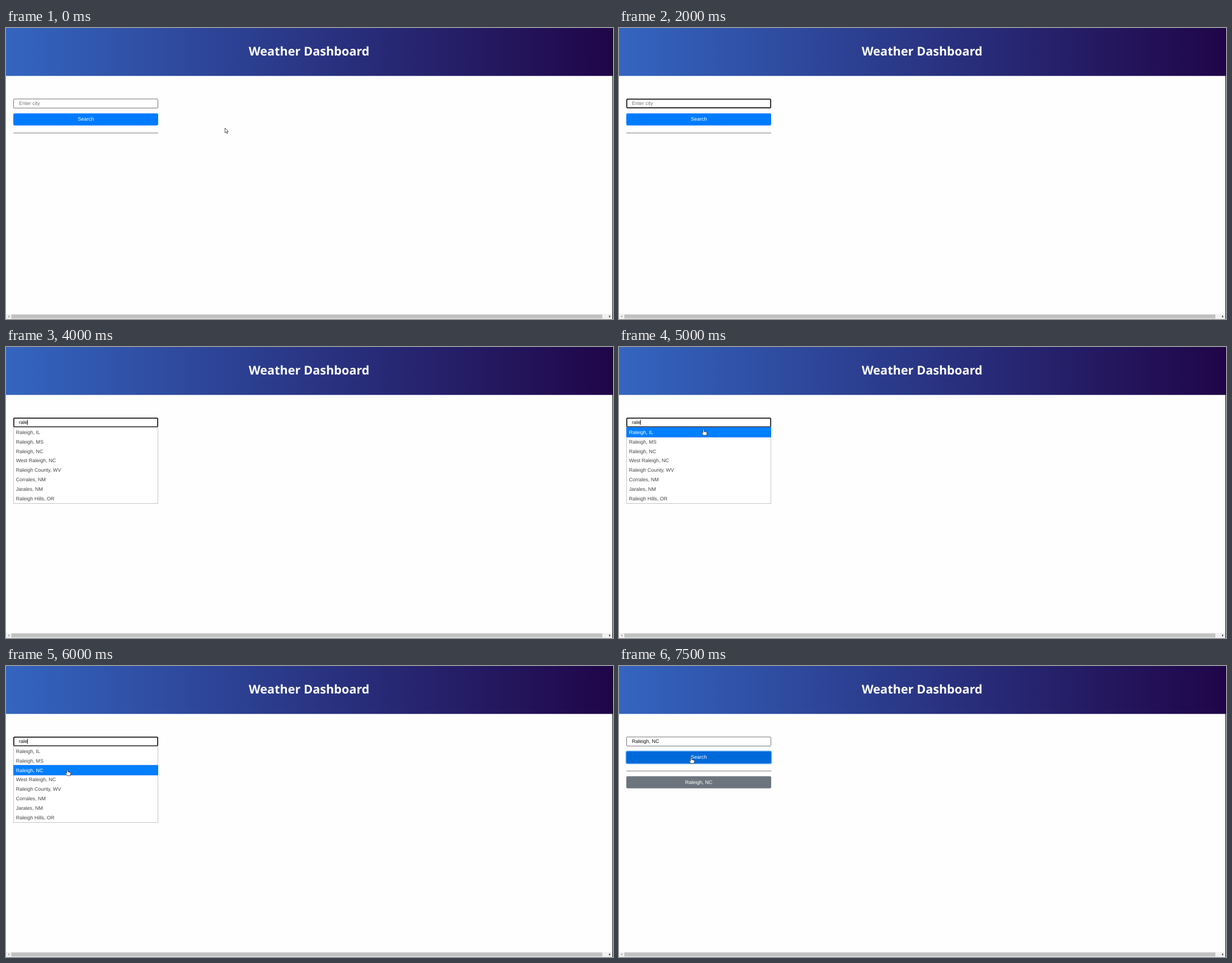
Animation, 1081 px wide and 518 px high, one loop 8000 ms. Source, as an HTML page:

```html
<!DOCTYPE html>
<html lang="en">
<head>
<meta charset="utf-8">
<title>Weather Dashboard</title>
<style>
  html, body { margin: 0; width: 100%; height: 100%; overflow: hidden; background: #fefefe; }
  svg { display: block; width: 1081px; height: 518px; }
  text { font: 9px "Liberation Sans", Arial, sans-serif; text-rendering: geometricPrecision; }
  .title { font: 600 21.6px "Noto Sans", "Open Sans", sans-serif; }
  .mid { text-anchor: middle; fill: #fff; }
  .cursor { fill: #fff; stroke: #222; stroke-width: .8; stroke-linejoin: round; }
</style>
</head>
<body>
<svg viewBox="0 0 1081 518">
  <defs>
    <linearGradient id="sky">
      <stop offset="0" stop-color="#3465c0"/>
      <stop offset="1" stop-color="#200548"/>
    </linearGradient>
  </defs>
  <rect width="1081" height="518" fill="#fefefe"/>
  <rect width="1081" height="85.3" fill="url(#sky)"/>
  <text class="title mid" x="539.7" y="49">Weather Dashboard</text>

  <rect id="box" fill="#fff"/>
  <text id="entry" x="23" y="137.2"></text>
  <rect id="caret" y="129.5" width="1" height="9"/>

  <rect id="ring" x="11.5" y="150.5" width="261" height="24.3" rx="3.5" fill="#80bdff"/>
  <rect id="button" x="13" y="152" width="258" height="21.4" rx="2.3"/>
  <text class="mid" x="142.2" y="165.3">Search</text>
  <rect x="13" y="186.4" width="258" height="1" fill="#777"/>

  <g id="saved">
    <rect x="13" y="196.3" width="258" height="21.4" rx="2.3" fill="#6c757d"/>
    <text class="mid" x="142" y="209.6">Raleigh, NC</text>
  </g>

  <g id="menu">
    <rect x="13.5" y="143" width="257" height="135.5" fill="#fff" stroke="#c5c5c5"/>
    <rect id="mark" x="13.3" width="257.4" height="17.4" fill="#007fff" stroke="#0060ff" stroke-width=".6"/>
  </g>

  <rect y="509" width="1081" height="9" fill="#f1f1f1"/>
  <rect x="9.5" y="510" width="1052.5" height="7" fill="#c1c1c1"/>
  <path d="M6 511.3v4.4l-2.6-2.2z" fill="#a3a3a3"/>
  <path d="M1074 511.3v4.4l2.6-2.2z" fill="#404050"/>
  <rect x="1080" width="1" height="518"/>

  <path id="arrow" class="cursor" d="M0 0V8.6L2 6.8L3.4 9.8L4.7 9.2L3.4 6.3H6Z"/>
  <path id="hand" class="cursor" d="M-1 .8Q0-.6 1 .8V4.2L5.4 5.2Q6.4 5.6 6.2 7L5.3 11H-.2L-3 7.2Q-3.4 5.8-2.2 5.9L-1 6.9Z"/>
</svg>
<script>
  const STEP = 500, ROW = 16.87;
  const el = id => document.getElementById(id);
  const set = (id, attrs) => {
    for (const name in attrs) el(id).setAttribute(name, attrs[name]);
  };
  const show = (id, on) => el(id).style.display = on ? "" : "none";
  const place = (id, at) => {
    show(id, at);
    if (at) set(id, { transform: `translate(${at})` });
  };

  const cities = ["Raleigh, IL", "Raleigh, MS", "Raleigh, NC", "West Raleigh, NC",
    "Raleigh County, WV", "Corrales, NM", "Jarales, NM", "Raleigh Hills, OR"];
  const rows = cities.map((city, i) => {
    const row = document.createElementNS("http://www.w3.org/2000/svg", "text");
    row.textContent = city;
    row.setAttribute("x", 17.7);
    row.setAttribute("y", 154.8 + i * ROW);
    return el("menu").appendChild(row);
  });

  const typing = { focus: true, caret: true };
  const listing = { ...typing, text: "rale", menu: true };
  const chosen = { ...typing, text: "Raleigh, NC" };
  const scenes = [
    { arrow: [390, 178] },
    {},
    { hover: true },
    typing,
    { focus: true },
    typing,
    { ...typing, text: "r" },
    { ...typing, text: "ral" },
    listing,
    { ...listing, caret: false },
    { ...listing, row: 0, hand: [150.5, 146.2] },
    { ...listing, row: 1, caret: false, hand: [126, 166] },
    { ...listing, row: 2, hand: [109.2, 184.2] },
    { ...chosen, hand: [109.2, 184.2] },
    { ...chosen, caret: false, over: true, hand: [128.3, 162.4] },
    { text: chosen.text, over: true, ring: true, saved: true, hand: [128.3, 162.4] }
  ];

  function draw(s) {
    const line = s.focus ? 1.7 : 1;
    set("box", {
      x: 13 + line / 2, y: 125.8 + line / 2,
      width: 258 - line, height: 17.2 - line, rx: 1.5,
      stroke: s.focus ? "#101010" : s.hover ? "#64647c" : "#767676",
      "stroke-width": line
    });
    el("entry").textContent = s.text || "Enter city";
    set("entry", { fill: s.text ? "#111" : "#757575" });
    const end = s.text ? el("entry").getComputedTextLength() : 0;
    set("caret", { x: 22.7 + end });
    show("caret", s.caret);

    set("button", { fill: s.over ? "#0069d9" : "#007bff" });
    show("ring", s.ring);
    show("saved", s.saved);

    show("menu", s.menu);
    const marked = s.row !== undefined;
    show("mark", marked);
    if (marked) set("mark", { y: 143 + s.row * ROW });
    rows.forEach((row, i) => row.setAttribute("fill", i === s.row ? "#fff" : "#454545"));

    place("arrow", s.arrow);
    place("hand", s.hand);
  }

  let current = -1;
  const start = performance.now();
  function tick() {
    const index = Math.floor((performance.now() - start) / STEP) % scenes.length;
    if (index !== current) draw(scenes[current = index]);
    requestAnimationFrame(tick);
  }
  tick();
</script>
</body>
</html>
```
